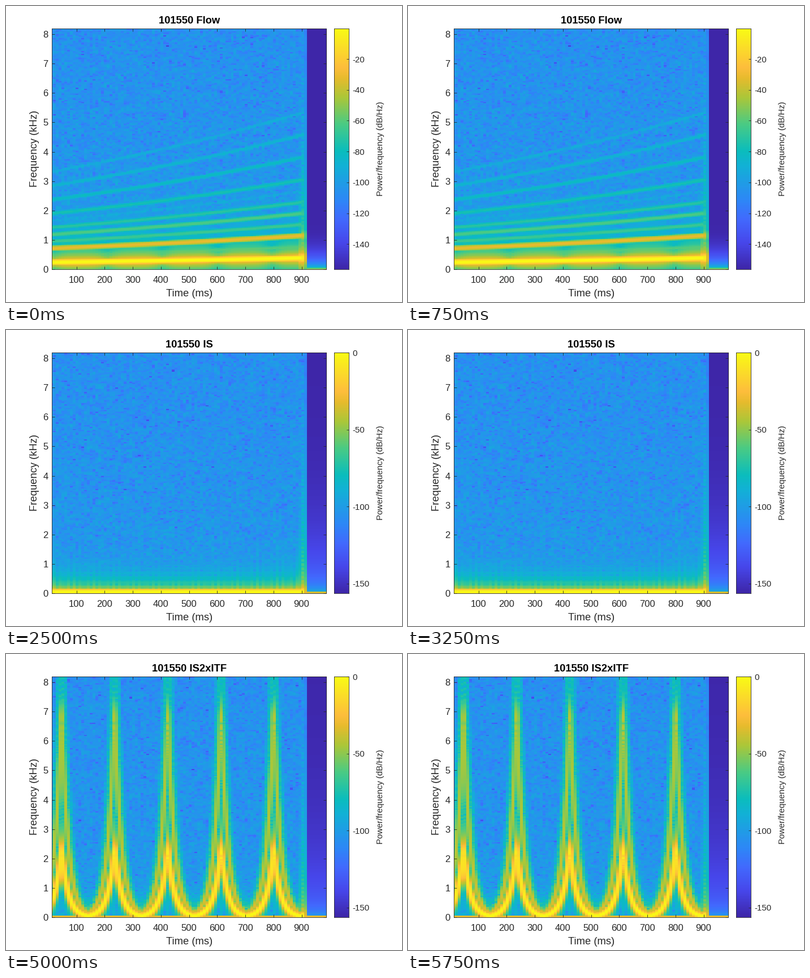
A matplotlib script for the animation above (6.25 s loop, 700 by 525 pixels).

```python
import numpy as np
import matplotlib.pyplot as plt
from matplotlib.animation import FuncAnimation
from matplotlib.colors import LinearSegmentedColormap

plt.rcParams["font.family"] = "Liberation Sans"
plt.rcParams["axes.unicode_minus"] = False

W, H, DPI = 700, 525, 100
PX = 72 / DPI
INK = "#262626"

PARULA = LinearSegmentedColormap.from_list("parula", [
    (0, "#3e26a8"), (.11, "#4747eb"), (.206, "#4269fe"), (.286, "#2e87f7"),
    (.43, "#12b1d6"), (.492, "#0bbdbd"), (.603, "#4acb84"), (.714, "#abc739"),
    (.794, "#e6bb2d"), (.841, "#febe3c"), (1, "#f9fb15")])

# Short-time spectrum: 25 ms Blackman window, 10 ms hop
FS, NFFT = 16384, 512
WIN_LEN = 410
END = 0.907
win = np.blackman(WIN_LEN)
time = np.arange(FS) / FS
cols = 0.0125 + 0.010 * np.arange(98)
freqs = np.arange(NFFT // 2 + 1) * FS / NFFT
starts = np.round((cols - 0.0125) * FS).astype(int)
fade = np.clip((END - time) / 0.007, 0, 1)
live, silent = cols < END, cols > 0.915
edges = (cols < 0.02) | live & (cols > 0.89)


def power(level):
    return 10 ** (level / 10)


def stft(x):
    chunks = np.stack([x[s:s + WIN_LEN] for s in starts])
    return np.fft.fft(chunks * win, NFFT).T[:len(freqs)] / win.sum()


def overtone(h):
    """Odd harmonics fall off steeply, even ones are weak but persistent."""
    return -15.5 * (h - 1) if h % 2 else -56 - 2.5 * h


def noise(seed, bump):
    rng = np.random.default_rng(seed)
    n = (rng.normal(size=FS) + 1j * rng.normal(size=FS)) / np.sqrt(2)
    spec = stft(n * (time < END)) * win.sum() / np.sqrt((win ** 2).sum())
    level = -101.3 + bump * np.exp(-freqs / 1500) - 2.5 * freqs / 8192
    return spec * np.sqrt(power(level))[:, None]


def spectrogram(seed, pitch, count, halo=None, tail=(-153, 60),
                dc=None, bump=9):
    phase = 2 * np.pi * np.cumsum(pitch(time)) / FS
    tone = sum(10 ** (overtone(h) / 20) * np.exp(1j * h * phase)
               for h in range(1, count + 1))
    p = np.abs(stft(tone * fade) + noise(seed, bump)) ** 2
    if halo:
        gap = np.maximum(np.abs(freqs[:, None] - pitch(cols)), 100)
        level = halo(cols) + 10 * edges
        p += live * power(level - 60 * np.log10(gap / 300))
    level, slope = tail
    skirt = level - slope * np.log10(np.maximum(freqs, 16) / 1000)
    p += silent * power(skirt)[:, None]
    if dc:
        p[:2] += power(dc(cols))
    return 10 * np.log10(p + np.finfo(float).eps)


def sweep(end):
    return lambda t: 235 * (end / 235) ** (t / 0.9)


def hum(t):
    return 45 + 0 * t


def pulses(t):
    """Exponential sweep up and down every 188 ms."""
    away = np.abs((t - 0.0477 + 0.094) % 0.188 - 0.094)
    return 2350 * np.exp(-43 * away)


def flow_halo(t):
    return -58 - 14 * (1 - np.abs(np.sin(np.pi * (t - 0.015) / 0.195))) ** 2


def sweep_halo(t):
    return -66 + 9 * t + (2 + 5 * t) * np.cos(2 * np.pi * t / 0.0277)


def hum_halo(t):
    return -78 + 50 * (t - 0.42) ** 2 + 7 * np.cos(2 * np.pi * t / 0.0232)


WIDE, ZERO = (-156.3, -0.15), (-156.2, 0.2)

scenes = [
    ("Flow", WIDE, 20, spectrogram(1, sweep(380), 14, flow_halo)),
    ("GT", WIDE, 20, spectrogram(2, sweep(855), 14, sweep_halo)),
    ("IS", ZERO, 50, spectrogram(3, hum, 1, hum_halo, tail=(-133, 35),
                                 dc=lambda t: -35 + 0 * t, bump=4)),
    ("IS2", WIDE, 20, spectrogram(4, sweep(855), 14, sweep_halo,
                                  dc=lambda t: -32 - 70 * t)),
    ("IS2xITF", ZERO, 50, spectrogram(5, pulses, 6, tail=(-135, 28),
                                      dc=lambda t: -31 + 0 * t, bump=4)),
]

fig = plt.figure(figsize=(W / DPI, H / DPI), dpi=DPI, facecolor="white")


def pixel_axes(x0, x1, y0=39.8, y1=466.8):
    ax = fig.add_axes([x0 / W, 1 - y1 / H, (x1 - x0) / W, (y1 - y0) / H])
    for spine in ax.spines.values():
        spine.set(linewidth=0.83 * PX, color=INK)
    ax.tick_params(direction="in", width=0.83 * PX, color=INK,
                   labelcolor=INK, pad=6.5 * PX)
    return ax


def label(x, y, text, size, color=INK, **kw):
    return fig.text(x / W, 1 - y / H, text, fontsize=size * PX, color=color,
                    ha="center", va="baseline", rotation_mode="anchor", **kw)


def show(ax, data, extent):
    return ax.imshow(data, cmap=PARULA, origin="lower", aspect="auto",
                     interpolation="nearest", extent=extent)


ax = pixel_axes(81.2, 566.2)
image = show(ax, scenes[0][3], (7.5, 987.5, -0.016, 8.208))
ax.set(xlim=(12.5, 987.5), ylim=(0, 8.2),
       xticks=range(100, 901, 100), yticks=range(9))
ax.tick_params(top=True, right=True, length=4.85 * PX, labelsize=16.67 * PX)
ax.tick_params(axis="x", pad=12 * PX)

bar = pixel_axes(580.2, 606.2)
ramp = show(bar, np.linspace(0, 1, 256)[:, None], (0, 1, *WIDE))
bar.set_xticks([])
bar.yaxis.tick_right()
bar.tick_params(axis="y", length=4.3 * PX, labelsize=15 * PX)

title = label(324, 31, "", 18.33, "black", weight="bold")
label(324, 515, "Time (ms)", 18.33)
label(55, 253, "Frequency (kHz)", 18.33, rotation=90)
label(666, 253, "Power/frequency (dB/Hz)", 15, rotation=90)


def update(i):
    name, (low, high), step, data = scenes[i]
    image.set_data(data)
    image.set_clim(low, high)
    ramp.set_extent((0, 1, low, high))
    bar.set_ylim(low, high)
    bar.set_yticks([v for v in range(-200, 1, step) if low <= v <= high])
    title.set_text("101550 " + name)
    return image, ramp, title


anim = FuncAnimation(fig, update, frames=len(scenes), interval=1250,
                     repeat=True, repeat_delay=0, blit=False)
plt.show()
```
